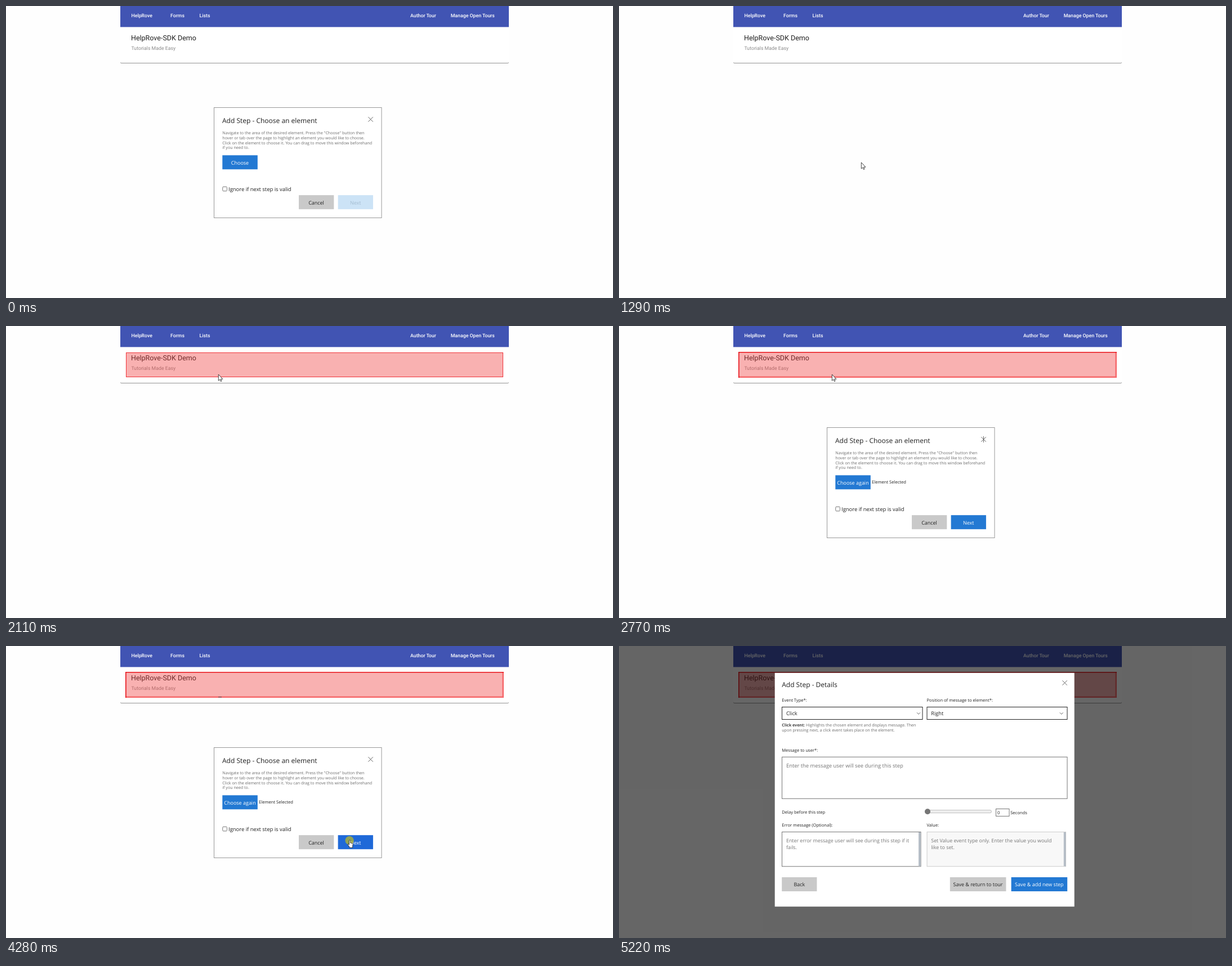
Animation, 1078 px wide and 519 px high, one loop 5.62 s. Source, as an HTML page:

```html
<!DOCTYPE html>
<html lang="en">
<head>
<meta charset="utf-8">
<title>Guided tour editor</title>
<style>
  html, body { margin: 0; width: 100%; height: 100%; overflow: hidden; background: #fefefe; }
  svg { display: block; width: 100%; height: 100%; }
  text { font-family: "Open Sans", "Noto Sans", sans-serif; text-rendering: geometricPrecision; white-space: pre; }
  .page text { font-family: Roboto, Arial, sans-serif; }
  .nav text { font-size: 8.75px; font-weight: 500; fill: #fff; }
  .page .brand { font-size: 12.5px; fill: #212121; }
  .page .sub { font-size: 8.75px; fill: #8a8a8a; }
  .card { fill: #fff; filter: drop-shadow(0 1px .7px rgba(0, 0, 0, .42)); }
  .title { font-size: 12px; fill: #222; }
  .small { font-size: 7.13px; fill: #6b6b6b; }
  .label { font-size: 7.6px; fill: #222; }
  .body { font-size: 9.45px; fill: #222; }
  .field { font-size: 9.2px; fill: #222; }
  .hint { font-size: 8.83px; fill: #757575; }
  .hint.big { font-size: 9.4px; }
  .btn { font-size: 8.97px; fill: #222; text-anchor: middle; }
  .btn.lit { fill: #fff; }
  .btn.off { fill: #a3bcd0; }
  .blue { fill: #2379d3; }
  .grey { fill: #c9c9c9; }
  .box { fill: #fff; stroke: #767676; }
  .line { fill: none; stroke: #555; stroke-width: .9; }
  .tint { fill: rgba(240, 60, 60, .4); }
  .pointer { fill: #fff; stroke: #222; stroke-width: .85; stroke-linejoin: round; }
</style>
</head>
<body>
<svg viewBox="0 0 1078 519" preserveAspectRatio="none">
  <g class="page">
    <rect class="card" x="203" y="20" width="690" height="81" rx="2"/>
    <g class="nav">
      <rect x="203" width="690" height="37.4" fill="#4154b3"/>
      <text x="222.5" y="20">HelpRove</text>
      <text x="292" y="20">Forms</text>
      <text x="343.5" y="20">Lists</text>
      <text x="718" y="20">Author Tour</text>
      <text x="789.7" y="20">Manage Open Tours</text>
    </g>
    <text class="brand" x="222" y="61">HelpRove-SDK Demo</text>
    <text class="sub" x="222.5" y="78">Tutorials Made Easy</text>
  </g>

  <g id="thin">
    <rect class="tint" x="213" y="47" width="670" height="44"/>
    <rect x="213.5" y="47.5" width="669" height="43" fill="none" stroke="#f0343a"/>
  </g>
  <g id="thick">
    <rect class="tint" x="212" y="46" width="672" height="46"/>
    <path d="M882.7 47V90.7H213" fill="none" stroke="#f6686b" stroke-width="2.5"/>
    <path d="M212.8 92V46.8H884" fill="none" stroke="#e8141b" stroke-width="1.6"/>
  </g>
  <rect id="trace" x="377" y="90" width="6" height="1.4" fill="#7d5557"/>

  <g id="picker">
    <rect x="369.5" y="180.5" width="297.5" height="196" fill="#fff" stroke="#989898"/>
    <text class="title" x="384" y="208">Add Step - Choose an element</text>
    <path class="line" d="M643.3 197.3l8.4 8.4m0-8.4l-8.4 8.4"/>
    <path id="tick" class="line" d="M647.5 196v11"/>
    <g class="small">
      <text x="384.3" y="228.4">Navigate to the area of the desired element. Press the "Choose" button then</text>
      <text x="384.3" y="237.1">hover or tab over the page to highlight an element you would like to choose.</text>
      <text x="384.3" y="245.8">Click on the element to choose it. You can drag to move this window beforehand</text>
      <text x="384.3" y="254.4">if you need to.</text>
    </g>
    <rect class="blue" x="384.3" y="265.3" width="62.5" height="25"/>
    <text id="choose" class="btn lit" x="415.5" y="281.5">Choose</text>
    <text id="picked" class="label" x="449" y="280.4">Element Selected</text>
    <rect class="box" x="384.8" y="321.3" width="7.6" height="7.6" rx="1.2"/>
    <text class="body" x="395" y="329.4">Ignore if next step is valid</text>
    <rect class="grey" x="520" y="336.2" width="62.3" height="25"/>
    <text class="btn" x="551" y="352.5">Cancel</text>
    <rect id="next" x="589.6" y="336.2" width="62.3" height="25"/>
    <text id="nextText" class="btn" x="620.7" y="352.5">Next</text>
  </g>

  <g id="details">
    <rect width="1078" height="519" fill="rgba(0,0,0,.6)"/>
    <rect x="276.7" y="47.8" width="532" height="415.4" fill="#fff"/>
    <text class="title" x="289.2" y="72.6">Add Step - Details</text>
    <path class="line" d="M787.4 61.3l8.4 8.4m0-8.4l-8.4 8.4"/>
    <text class="label" x="289.2" y="99">Event Type*:</text>
    <text class="label" x="546.5" y="99">Position of message to element*:</text>
    <rect class="box" x="289.5" y="108.5" width="249.5" height="22" style="stroke:#222"/>
    <rect class="box" x="547" y="108.5" width="249" height="22" style="stroke:#222"/>
    <text class="field" x="297" y="123.2">Click</text>
    <text class="field" x="554.3" y="123.2">Right</text>
    <path class="line" d="M529 118.3l3 3 3-3M782.8 118.3l3 3 3-3"/>
    <text class="small" x="289.2" y="143.2"><tspan font-weight="700" fill="#444">Click event:</tspan> Highlights the chosen element and displays message. Then</text>
    <text class="small" x="289.2" y="151.8">upon pressing next, a click event takes place on the element.</text>
    <text class="label" x="289.2" y="187.8">Message to user*:</text>
    <rect class="box" x="289.5" y="197.3" width="506.5" height="74"/>
    <text class="hint big" x="297" y="215.6">Enter the message user will see during this step</text>
    <text class="label" x="289.2" y="298">Delay before this step</text>
    <rect x="543.5" y="291.7" width="118" height="5" rx="2.5" fill="#efefef" stroke="#b2b2b2" stroke-width=".8"/>
    <circle cx="548" cy="294.2" r="5" fill="#757575"/>
    <rect class="box" x="669.5" y="289.5" width="23.5" height="13"/>
    <text class="label" x="672" y="298.8">0</text>
    <text class="label" x="695.2" y="298.8">Seconds</text>
    <text class="label" x="289.2" y="321">Error message (Optional):</text>
    <text class="label" x="546.5" y="321">Value:</text>
    <rect class="box" x="289.5" y="330.5" width="246.5" height="61.3"/>
    <rect x="532" y="331" width="3.8" height="60.5" fill="#b5bdc6"/>
    <rect class="box" x="547" y="330.5" width="246.5" height="61.3" style="fill:#f8f8f8;stroke:#ccc"/>
    <rect x="789.8" y="331" width="3.8" height="60.5" fill="#b5bdc6"/>
    <g class="hint">
      <text x="297" y="348.7">Enter error message user will see during this step if it</text>
      <text x="297" y="361.2">fails.</text>
      <text x="554.3" y="348.7">Set Value event type only. Enter the value you would</text>
      <text x="554.3" y="361.2">like to set.</text>
    </g>
    <rect class="grey" x="289.2" y="411" width="62.2" height="25"/>
    <text class="btn" x="320.3" y="427.2">Back</text>
    <rect class="grey" x="587.8" y="411" width="99.6" height="25"/>
    <text class="btn" x="637.5" y="427.2">Save &amp; return to tour</text>
    <rect class="blue" x="696.6" y="411" width="99.6" height="25"/>
    <text class="btn lit" x="746.3" y="427.2">Save &amp; add new step</text>
  </g>

  <g id="cursor">
    <circle id="press" cy=".7" r="7.6" fill="rgba(222,200,0,.6)"/>
    <path id="arrow" class="pointer" d="M.3 0V11.2L2.8 8.9 4.4 12.6 6.1 11.8 4.5 8.3H7.9Z"/>
    <path id="hand" class="pointer" d="M-.6 1.2Q-.6 0 .5 0T1.6 1.2V4.8L5 5.8Q6.2 6.1 6.1 7.4L5.5 11.4V13.4H-.2V11.8L-3 8.2Q-3.2 6.8-1.9 7L-.6 8.2Z"/>
  </g>
</svg>
<script>
const LOOP = 5620;
const $ = id => document.getElementById(id);
const show = (id, on) => { $(id).style.display = on ? "" : "none"; };
const within = (t, a, b) => t >= a && t < b;

const easeIn = p => p * p;
const easeOut = p => 1 - (1 - p) ** 2;
const easeBoth = p => p * p * (3 - 2 * p);

// Cursor legs: first step, last step, number of steps, end point, easing
const start = [1171, 567];
const legs = [
  [70, 610, 9, 448, 272, easeOut],
  [680, 820, 3, 409, 279, easeOut],
  [1290, 1290, 1, 430, 278, easeOut],
  [1420, 1770, 6, 388, 132, easeBoth],
  [1840, 2110, 5, 377, 86, easeOut],
  [2770, 2770, 1, 378, 86, easeOut],
  [2840, 3330, 8, 600, 326, easeBoth],
  [3400, 3680, 5, 610, 345, easeOut],
  [4880, 5220, 6, 1273, 568, easeIn]
];

function cursorAt(t) {
  let [x, y] = start;
  for (const [t0, t1, n, toX, toY, ease] of legs) {
    if (t < t0) break;
    const gap = n > 1 ? (t1 - t0) / (n - 1) : 1;
    const step = Math.min(n, Math.floor((t - t0) / gap + 0.05) + 1);
    const p = ease(step / n);
    x += (toX - x) * p;
    y += (toY - y) * p;
  }
  return [x, y];
}

function draw(t) {
  const chosen = t >= 2440;
  const pressed = within(t, 4280, 4350);
  const [x, y] = cursorAt(t);

  show("thin", within(t, 1970, 2440));
  show("thick", chosen);
  show("trace", within(t, 2840, 4350));
  show("picker", t < 1220 || within(t, 2570, 4350));
  show("picked", chosen);
  show("tick", within(t, 2770, 3400) || within(t, 3950, 4080));
  show("details", t >= 4350);

  $("choose").textContent = chosen ? "Choose again" : "Choose";
  $("next").setAttribute("fill", pressed ? "#1f69d8" : chosen ? "#2379d3" : "#cce3f6");
  $("nextText").setAttribute("class", chosen ? "btn lit" : "btn off");

  const overButton = within(t, 680, 1220) || (within(t, 3330, 4350) && y > 336);
  show("hand", overButton);
  show("arrow", !overButton);
  show("press", pressed || within(t, 2370, 2440));
  $("cursor").setAttribute("transform", `translate(${x.toFixed(2)} ${y.toFixed(2)})`);
}

function tick() {
  draw(performance.now() % LOOP);
  requestAnimationFrame(tick);
}
tick();
</script>
</body>
</html>
```
